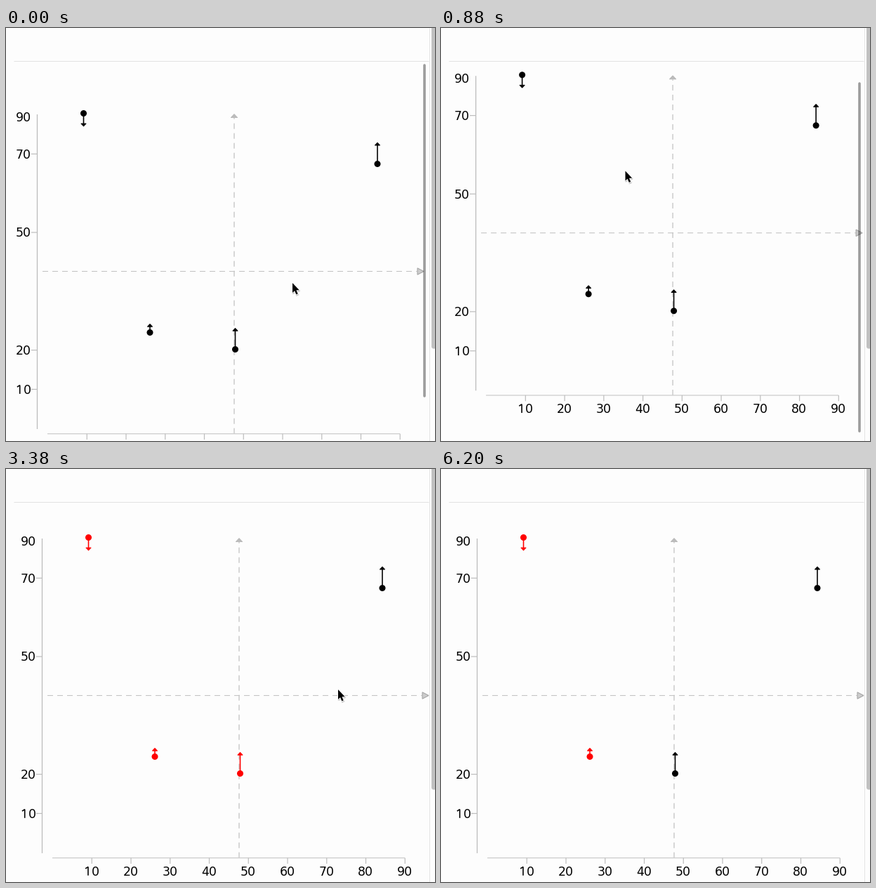
Write a matplotlib script that moves like this. It is 611 by 588 pixels and loops after 6.8 s.

```python
import matplotlib.pyplot as plt
import numpy as np
from matplotlib.animation import FuncAnimation
from matplotlib.patches import Circle, FancyBboxPatch, Polygon, Rectangle
from matplotlib.transforms import Affine2D

W, H, DPI = 611, 588, 100
PX = 72 / DPI
LOOP, STEP = 6800, 20
TICK, LAST = 147.7, 42      # the picture moves on once per tick
LEFT, BASE = 51.5, 553.7    # axis positions at rest
UNIT = 5.575                # pixels per chart unit

fig = plt.figure(figsize=(W / DPI, H / DPI), dpi=DPI, facecolor="#fdfdfd")
ax = fig.add_axes([0, 0, 1, 1])
ax.set_xlim(0, W)
ax.set_ylim(H, 0)
ax.axis("off")

# The chart pans inside a clipped pane.
pan = Affine2D()
moving = pan + ax.transData
pane = Rectangle((0, 46.5), 602.5, H, transform=ax.transData)


def in_pane(artist, zorder=2):
    artist.set(transform=moving, clip_path=pane, zorder=zorder, snap=False)
    return artist


def line(xs, ys, color, width, **kw):
    kw.setdefault("solid_capstyle", "butt")
    return ax.plot(xs, ys, color=color, lw=width * PX, **kw)[0]


def chart_line(xs, ys, color, width, zorder=2, **kw):
    return in_pane(line(xs, ys, color, width, **kw), zorder)


def chart_shape(patch, zorder=2):
    return in_pane(ax.add_patch(patch), zorder)


def label(cx, cy, text):
    """Two digits centred on a point; the 1 is a plain stem with a flag."""
    style = dict(family="DejaVu Sans", size=17.4 * PX, color="black", va="baseline")
    if text[0] == "1":
        chart_line([cx - 8.6, cx - 4.8, cx - 4.8], [cy - 3.4, cy - 5.8, cy + 6.4],
                   "black", 1.6, solid_joinstyle="miter")
        in_pane(ax.text(cx, cy + 6.4, text[1], ha="left", **style))
    else:
        in_pane(ax.text(cx, cy + 6.4, text, ha="center", **style))


def guide(xs, ys, width):
    dashes = (0, (8 / width, 6 / width))
    chart_line(xs, ys, "#c4c4c4", width, zorder=1, linestyle=dashes)


def draw_axes():
    grey = "#bdbdbd"
    chart_line([LEFT, LEFT], [99, 547], grey, 1.3)
    label(31.5, 102.7, "90")
    for value in (70, 50, 20, 10):
        y = 546.3 - 5.585 * value
        chart_line([LEFT - 8.5, LEFT], [y, y], grey, 1.2)
        label(31.5, y, str(value))

    chart_line([66, 568], [BASE, BASE], "#cacaca", 1.2)
    for value in range(10, 100, 10):
        x = 66.5 + UNIT * value
        chart_line([x, x], [BASE, BASE + 8.3], grey, 1.2)
        label(x - 0.5, 572.3, str(value))

    guide([59, 592.5], [322.5, 322.5], 1.1)
    guide([332, 332], [BASE, 104], 1.3)
    chart_shape(Polygon([(593, 317.8), (602, 322.5), (593, 327.2)],
                        fc="#cccccc", ec="#a6a6a6", lw=1.1 * PX))
    chart_shape(Polygon([(327.3, 103.6), (332, 98.6), (336.7, 103.6)],
                        fc="#bcbcbc", ec="#b4b4b4", lw=0.8 * PX))


class Marker:
    """A dot with an arrow; selected (red) from one tick until another."""

    def __init__(self, x, y, reach, start, end):
        self.spot = (x, y)
        self.span = (start, end)
        way = np.sign(reach)
        tip = y + reach
        base = tip - 4.2 * way
        self.stem = chart_line([x, x], [y, base], "black", 1.6, zorder=3)
        head = Polygon([(x - 3.5, base), (x, tip - 0.5 * way), (x + 3.5, base)],
                       lw=PX, joinstyle="round")
        self.shapes = [chart_shape(head, 3),
                       chart_shape(Circle((x, y), 4.5, lw=0), 4)]

    def paint(self, n):
        color = "red" if self.span[0] <= n < self.span[1] else "black"
        self.stem.set_color(color)
        for shape in self.shapes:
            shape.set_color(color)


draw_axes()
markers = [Marker(117.5, 97.5, 18.8, 11, 99), Marker(212, 409.5, -12.5, 17, 99),
           Marker(333.5, 433.5, -30.5, 21, 37), Marker(536, 169.5, -30.7, 26, 31)]

# Pane frame and page scrollbar
line([11, 602], [46.5, 46.5], "#e2e2e2", 1)
line([602.5, 602.5], [0, H], "#e4e4e4", 1)
ax.add_patch(FancyBboxPatch((609, -20), 10, 473.5, fc="#c1c1c1", lw=0,
                            boxstyle="round,pad=3,rounding_size=3"))

bar = line([595.8, 595.8], [53, 548], "black", 3.6, solid_capstyle="round", zorder=6)

ARROW = np.array([(0, 0), (0, 14), (3.1, 11.2), (5.3, 16.4), (7.7, 15.4),
                  (5.5, 10.3), (9.7, 10.2)])
pointer = [(ax.add_patch(Polygon(ARROW, zorder=9, **look)), offset)
           for look, offset in (
               (dict(color="black", lw=2 * PX, alpha=0.18), (0.6, 1.3)),
               (dict(color="white", lw=2 * PX), (0, 0)),
               (dict(color="black", lw=0), (0, 0)))]

# Cursor stops: tick and place, often a marker to click
first, second, third, fourth = (m.spot for m in markers)
STOPS = [(0, (408, 363)), (4, (410, 266)), (8, (115, 141)),
         (10, first), (11, first), (13, (194, 265)),
         (16, second), (18, second), (21, third), (23, (473, 314)),
         (24, (539, 214)), (26, fourth), (30, fourth), (31, (524, 227)),
         (34, (291, 432)), (36, third), (38, third),
         (40, (241, 480)), (LAST, (600, 640))]
stop_ticks = [tick for tick, _ in STOPS]
stop_xs, stop_ys = zip(*(place for _, place in STOPS))


def ease(start, end, u):
    u = np.clip(u, 0, 1)
    return start + (end - start) * u * u * (3 - 2 * u)


def pan_at(n):
    """Drag the chart up in an arc, then let it spring back to rest."""
    if n <= 4:
        u = n / 4
        return ease(-7, -4.5, u) - 11 * np.sin(np.pi * u), ease(24, -64.5, u)
    if n <= 8:
        u = (n - 4) / 4
        return ease(-4.5, 0.7, u), ease(-64.5, 3, u)
    return 0, 0


def move_bar(dy, n):
    top = 53 - 0.85 * min(dy, 0)
    bottom = 548 - dy if dy > 0 else top + 495
    bar.set_ydata([top, bottom])
    bar.set_alpha(0.38 * np.clip((12 - n) / 3, 0, 1))


def update(i):
    t = i * STEP + STEP / 2
    n = min(LAST, int((t + 20) / TICK))

    dx, dy = pan_at(n)
    pan.clear().translate(dx, dy)
    move_bar(dy, n)

    for marker in markers:
        marker.paint(n)

    tip = np.array([np.interp(n, stop_ticks, stop_xs),
                    np.interp(n, stop_ticks, stop_ys)])
    for shape, offset in pointer:
        shape.set_xy(ARROW + tip + offset)
    return []


anim = FuncAnimation(fig, update, frames=LOOP // STEP, interval=STEP,
                     repeat=True, repeat_delay=0, blit=False)
plt.show()
```
